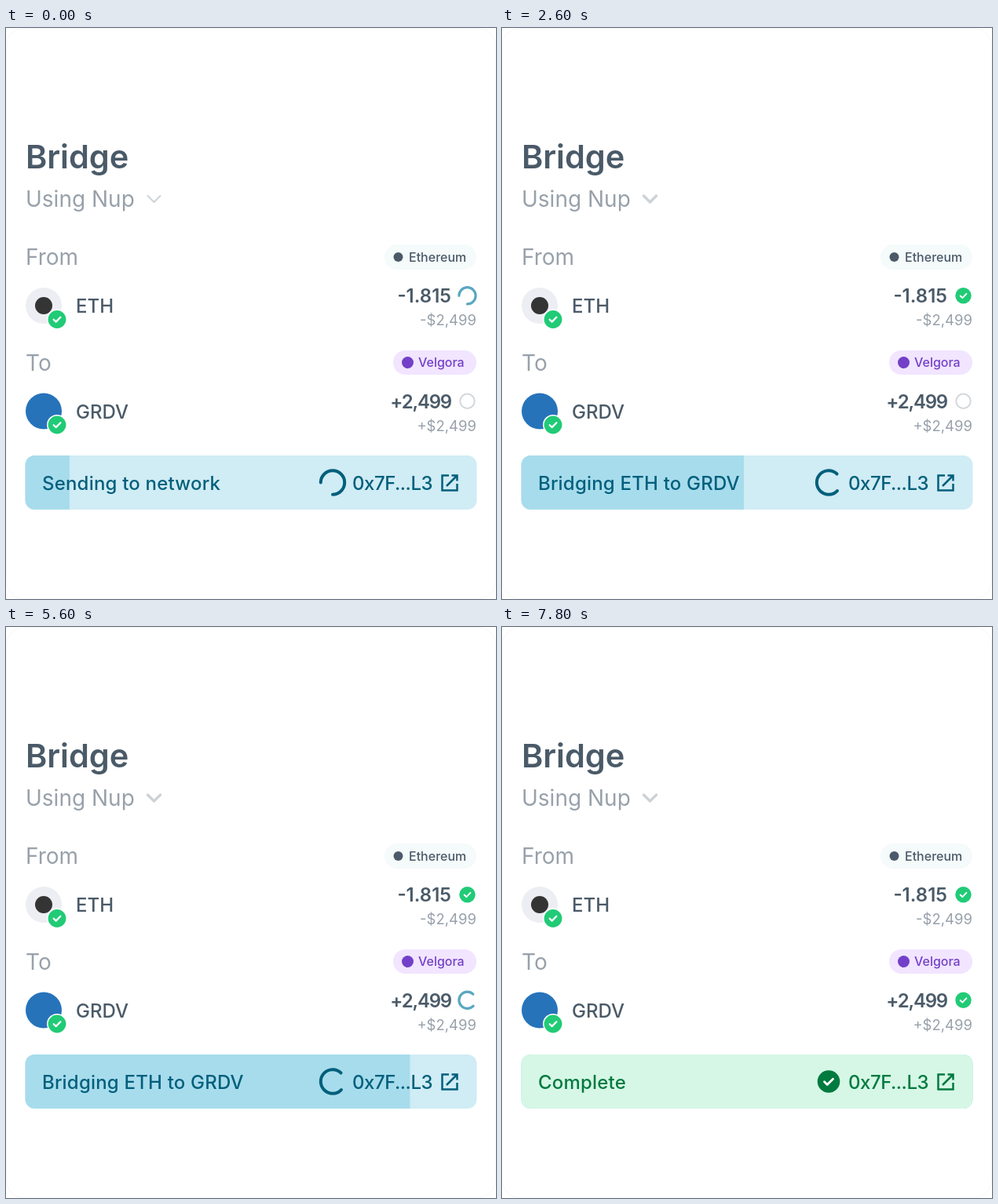
Write an HTML page that moves like this. It is 624 by 728 pixels and loops after 8 s.

```html
<!DOCTYPE html>
<html lang="en">
<head>
<meta charset="utf-8">
<title>Bridge</title>
<style>
  html, body { margin: 0; width: 100%; height: 100%; overflow: hidden; background: #fff; }
  svg { display: block; width: 624px; height: 728px; font: 500 24px Inter, sans-serif; }
  .title { font-size: 41.5px; font-weight: 600; }
  .label { font-size: 28px; font-weight: 400; fill: #98a1ab; }
  .amount { font-weight: 600; text-anchor: end; }
  .value { font-size: 18.5px; font-weight: 400; fill: #98a1ab; text-anchor: end; }
  .chip { font-size: 16px; }
  .status { letter-spacing: .008em; }
  .tight { letter-spacing: -.05em; }
  .hash { letter-spacing: -.02em; }
  .line { fill: none; stroke-linecap: round; stroke-linejoin: round; }
</style>
</head>
<body>
<svg viewBox="0 0 624 728" fill="#4a5a68">
  <defs>
    <clipPath id="barClip"><rect x="24.5" y="545" width="575" height="69" rx="12"/></clipPath>
    <g id="check">
      <circle r="10.2" fill="#21cb76"/>
      <path class="line" d="M-3.8 .2L-1.2 2.8L3.9 -2.4" stroke="#fff" stroke-width="2"/>
    </g>
    <!-- three-quarter arc, gap at the lower left -->
    <path id="arc" class="line" d="M-10.6 0A10.6 10.6 0 1 1 0 10.6" stroke="#5aa7c2" stroke-width="3.2"/>
    <g id="link" fill="currentColor">
      <text class="hash" x="441" y="588.5">0x7F...L3</text>
      <path class="line" stroke="currentColor" stroke-width="2.5" style="stroke-linecap:butt;stroke-linejoin:miter"
        d="M564 570.5H555.5V589.5H574.5V581M567.5 570.5H574.5V577.5M574.5 570.5L561 584"/>
    </g>
  </defs>

  <rect x=".5" y=".5" width="623" height="727" rx="22" fill="#fff" stroke="#f6f7f8"/>
  <text class="title" x="25" y="179">Bridge</text>
  <text class="label" x="25" y="228">Using Nup</text>
  <path id="chevron" class="line" d="M180.5 214L188.5 222L196.5 214" stroke="#cdd2d7"/>

  <text class="label" x="25" y="302">From</text>
  <rect x="482" y="276" width="117" height="32" rx="16" fill="#f5fafb"/>
  <circle cx="499.5" cy="292" r="6"/>
  <text class="chip" x="513" y="298">Ethereum</text>
  <circle cx="48" cy="354" r="23" fill="#edeef3"/>
  <circle cx="48" cy="354" r="11" fill="#343434"/>
  <text x="89" y="363">ETH</text>
  <text class="amount" x="567" y="350">-1.815</text>
  <text class="value" x="599" y="379">-$2,499</text>

  <text class="label" x="25" y="437">To</text>
  <rect x="493" y="411" width="106" height="31" rx="15.5" fill="#f1e5ff"/>
  <circle cx="511.5" cy="426.5" r="7.5" fill="#7340c8"/>
  <text class="chip" x="525" y="432" fill="#7340c8">Velgora</text>
  <circle cx="48" cy="488.5" r="23" fill="#2673ba"/>
  <text x="89" y="498">GRDV</text>
  <text class="amount tight" x="567" y="485">+2,499</text>
  <text class="value" x="599" y="514">+$2,499</text>

  <g fill="#fff">
    <circle cx="65" cy="371.5" r="13"/><circle cx="65" cy="506" r="13"/>
  </g>
  <use href="#check" transform="translate(65 371.5) scale(1.12)"/>
  <use href="#check" transform="translate(65 506) scale(1.12)"/>

  <g transform="translate(587.5 341.3)">
    <g id="fromBusy"><use class="spin" href="#arc"/></g>
    <use id="fromDone" href="#check"/>
  </g>
  <g transform="translate(587.5 475.8)">
    <circle id="toIdle" r="9.2" fill="none" stroke="#d3d7dc" stroke-width="2"/>
    <g id="toBusy"><use class="spin" href="#arc"/></g>
    <use id="toDone" href="#check"/>
  </g>

  <g clip-path="url(#barClip)">
    <rect x="24" y="545" width="576" height="69" fill="#d0ecf4"/>
    <rect id="fill" x="24" y="545" height="69" fill="#a7dcec"/>
    <g fill="#005f7c" color="#005f7c">
      <text class="status" id="sending" x="46" y="588.5">Sending to network</text>
      <text class="status" id="swapping" x="46" y="588.5">Swapping ETH to GRDV</text>
      <text class="status" id="bridging" x="46" y="588.5">Bridging ETH to GRDV</text>
      <use href="#link"/>
      <g transform="translate(416 579.5)">
        <path class="spin line" d="M-15.2 0A15.2 15.2 0 1 1 0 15.2" stroke="#005f7c" stroke-width="4"/>
      </g>
    </g>
    <g id="complete" fill="#007a3f" color="#007a3f">
      <rect x="24" y="545" width="576" height="69" fill="#d6f7e6"/>
      <text class="status" x="46" y="588.5">Complete</text>
      <circle cx="416" cy="579.5" r="14.3"/>
      <path class="line" d="M410.5 579.8L414.2 583.5L421.5 576.2" stroke="#fff" stroke-width="2.8"/>
      <use href="#link"/>
    </g>
  </g>
</svg>
<script>
  const LOOP = 8000;
  const $ = id => document.getElementById(id);
  const spinners = document.querySelectorAll('.spin');
  const clamp = u => Math.min(1, Math.max(0, u));
  const easeOut = (t, start, length = 300) => 1 - (1 - clamp((t - start) / length)) ** 2;
  const fade = (id, opacity) => $(id).setAttribute('opacity', opacity);

  function draw(t) {
    const swap = easeOut(t, 900), bridge = easeOut(t, 2000), receive = easeOut(t, 3700),
          arrive = easeOut(t, 6100), done = easeOut(t, 7050);

    fade('sending', 1 - swap);
    fade('swapping', swap * (1 - bridge));
    fade('bridging', bridge);
    fade('fromBusy', 1 - bridge);
    fade('fromDone', bridge);
    fade('toIdle', 1 - receive);
    fade('toBusy', receive * (1 - arrive));
    fade('toDone', arrive);
    fade('complete', done);

    // the bar fills in two long legs, one for each side of the transfer
    $('fill').setAttribute('width', 284 * easeOut(t, -200, 1900) + 292 * easeOut(t, 4500, 2400));
    $('chevron').setAttribute('stroke-width', t < 100 ? 2 : 3.4);

    // one eased turn per second, with a rest between turns
    const u = clamp((t % 1000 - 310) / 500);
    const angle = 360 * u * u * (3 - 2 * u);
    spinners.forEach(s => s.setAttribute('transform', `rotate(${angle})`));
  }

  const began = performance.now();
  function tick() {
    draw((performance.now() - began) % LOOP);
    requestAnimationFrame(tick);
  }
  tick();
</script>
</body>
</html>
```
